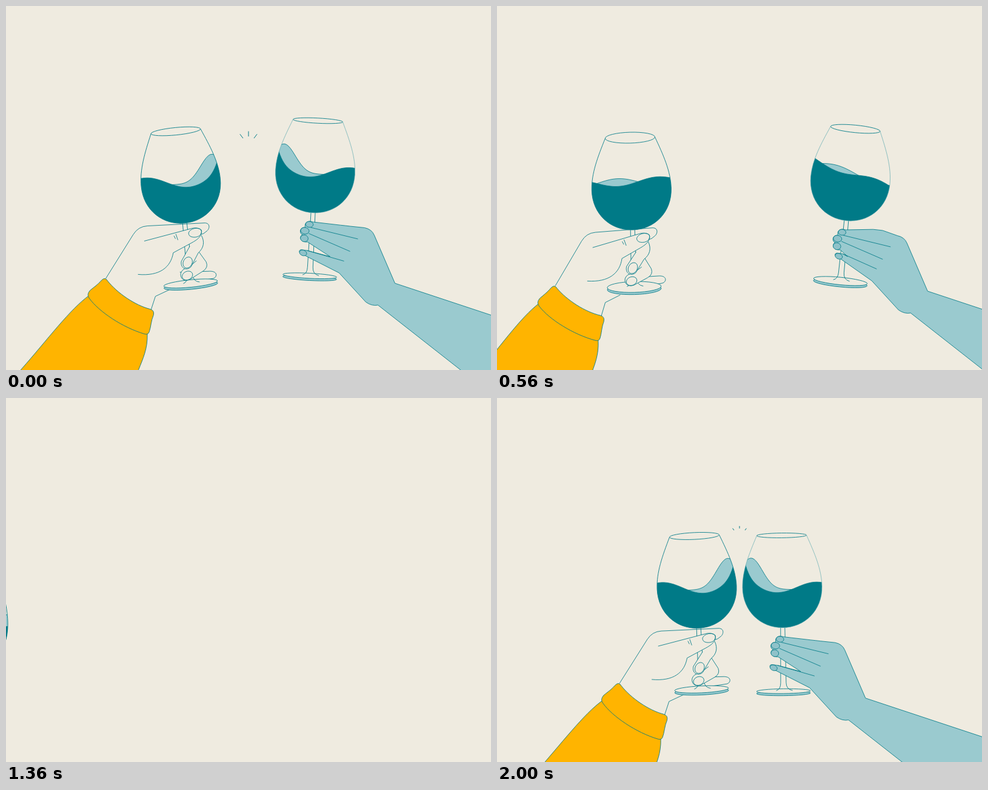
Write an HTML page with a canvas that moves like this. It is 800 px wide and 600 px high and loops after 2080 ms.

```html
<!DOCTYPE html>
<html lang="en">
<head>
<meta charset="utf-8">
<title>Cheers</title>
<style>
html, body { margin: 0; width: 100%; height: 100%; overflow: hidden; background: #efebe0; }
canvas { display: block; }
</style>
</head>
<body>
<canvas id="stage" width="800" height="600"></canvas>
<script>
const ctx = document.getElementById('stage').getContext('2d');
const LOOP = 2080, STEP = 80, RAD = Math.PI / 180;
const BG = '#efebe0', TEAL = '#007a87', LIGHT = '#9acacf', NAIL = '#8fc2c9', YELLOW = '#ffb400';
const { sin, cos, exp, min, max, PI } = Math;

// Key points: time, distance from the middle, then height and outward lean of the left and right glass
const keys = [
  [0, 105.2, 357.8, 5.6, 340.8, 3],
  [240, 122.6, 355.2, 8.9, 336.1, 7.8],
  [560, 176.3, 369, 1.6, 353.8, 5.6],
  [880, 409, 417, -8.9, 417.2, -10.3],
  [1040, 490, 436, -9, 432, -12],
  [1360, 473.5, 446, -9, 438, -9.5],
  [1680, 354.2, 444.5, -6.7, 437.1, -12.1],
  [1840, 232, 428, -3, 427, -7],
  [2000, 67.3, 379.3, 2.7, 378.5, -.7]
];

// Smooth cyclic curve through the key points
function pose(t) {
  const n = keys.length, i = keys.findLastIndex(k => k[0] <= t);
  const around = [i - 1, i, i + 1, i + 2];
  const [a, b, c, d] = around.map(j => keys[(j + n) % n]);
  const [t0, t1, t2, t3] = around.map(j => keys[(j + n) % n][0] + LOOP * Math.floor(j / n));
  const span = t2 - t1, u = (t - t1) / span, v = 1 - u;
  return b.map((_, k) => {
    const m1 = (c[k] - a[k]) / (t2 - t0) * span;
    const m2 = (d[k] - b[k]) / (t3 - t1) * span;
    return (1 + 2 * u) * v * v * b[k] + u * v * v * m1 + u * u * (3 - 2 * u) * c[k] - u * u * v * m2;
  });
}

const bell = (x, mid, width) => exp(-(((x - mid) / width) ** 2));
const mix = (a, b, k) => a + (b - a) * k;

// Wine heights: a slope and a travelling ripple, thrown up the inner wall by the clink
function wine(t, side, lean) {
  const splash = bell((t + LOOP / 2) % LOOP, LOOP / 2 - 50, 170);
  const slope = max(0, lean) * (side > 0 ? 2.2 : 4.6);
  const ripple = u => min(10, t / 90) * cos(PI * (u - 1.2 + 2 * t / LOOP));
  return {
    front(u) {
      const v = u * side;
      const thrown = 66 + 9 * cos(PI * (v + .85)) + 55 * exp(7 * (v - 1));
      return mix(79 + slope * v + ripple(u), thrown, splash);
    },
    back(u) {
      const v = u * side;
      return mix(79 + .7 * slope * v - ripple(u), 62 + 54 * bell(v, .78, .4), splash);
    }
  };
}

function paint(path, fill, line = TEAL, width = .85) {
  if (typeof path === 'string') path = new Path2D(path);
  if (fill) { ctx.fillStyle = fill; ctx.fill(path); }
  ctx.strokeStyle = line;
  ctx.lineWidth = width;
  ctx.stroke(path);
}

function oval(x, y, rx, ry, fill, turn = 0) {
  const p = new Path2D();
  p.ellipse(x, y, rx, ry, turn * RAD, 0, 7);
  paint(p, fill);
}

// Draws with (x, y) as origin, turned, then shifted
function within(x, y, turn, dx, dy, draw) {
  ctx.save();
  ctx.translate(x, y);
  ctx.rotate(turn * RAD);
  ctx.translate(dx, dy);
  draw();
  ctx.restore();
}

function surface(cx, height) {
  const p = new Path2D();
  p.moveTo(cx - 80, 20);
  for (let x = -80; x <= 80; x += 2) p.lineTo(cx + x, -height(max(-1, min(1, x / 66))));
  p.lineTo(cx + 80, 20);
  return p;
}

const bowl = new Path2D('M-41-152C-54-122-65.5-95-65.5-67C-65.5-27-36 0 0 0C36 0 65.5-27 65.5-67C65.5-95 54-122 41-152');

function glass(x, y, tilt, depth, { front, back }, edge, edgeWidth) {
  within(x, y, tilt, 0, 0, () => {
    const foot = 113 - 2.1 * depth;
    oval(0, foot + 3.5, 44.5, depth, LIGHT);
    oval(0, foot, 44.5, depth, BG);
    paint(`M-3.5 0L-4.5 ${foot - 14}Q-4.5 ${foot - 3}-12 ${foot - 1}M3.5 0L4.5 ${foot - 14}Q4.5 ${foot - 3} 15 ${foot - 1}`);
    ctx.save();
    ctx.clip(bowl);
    ctx.rotate(-tilt * RAD);
    const cx = 68 * sin(tilt * RAD);
    paint(surface(cx, back), LIGHT);
    paint(surface(cx, front), TEAL);
    ctx.restore();
    paint(bowl, null, edge, edgeWidth);
    oval(0, -152, 41, depth);
  });
}

function leftSide(t, x, y, lean, swing) {
  const depth = 6.8 + 2.2 * swing, slide = (6 - depth) * .8;
  const arm = draw => within(x - .8, y + slide, -1.2 * swing, -294.8, -357.8, draw);

  arm(() => {
    paint('M166 450L211 377Q219 364 234 363L329 357.5C338 358 337 367 332 371Q327 376 321 377');
    paint('M241 501L248 479L273 467');
    paint('M288 439L338 437C351 437 350 447 343 449L318 453');
  });
  glass(x, y, -lean, depth, wine(t, 1, lean), TEAL, .85);

  // Fingers curled around the stem follow the glass
  within(x - .8, y + slide, 5.6 - lean, -294.8, -357.8, () => {
    paint('M318 404L331 422Q335 431 326 437L304 451C294 455 288 449 289 441Q291 434 299 432', BG);
    oval(300, 444.5, 9, 7, BG, -25);
    paint('M323 378C329 389 327 399 318 407L306 430C299 437 288 433 290 421L304 396', BG);
    oval(300.5, 423, 7.3, 9.5, BG, 25);
    paint('M308 426L315 420');
  });
  arm(() => {
    paint('M229 388L306 367C315 364 326 367 323 375C321 382 315 386 308 390L277 407C273 431 255 446 219 443', BG);
    paint('M302 374C305 366 318 364 323 369C325 378 317 382 309 381Q302 380 302 374Z');
    paint('M278 379L280.5 384M281 376L284.5 386');
    paint('M139 478C108 500 70 552 28 600L-40 682L190 680L221 600C228 582 236 565 235 541', YELLOW);
    paint('M159 453Q165 447 169 454C185 474 215 494 239 500Q247 502 245 510C241 519 241 530 238 538Q236 543 230 541C195 531 155 505 139 483Q134 477 140 470C147 464 152 461 159 453Z', YELLOW);
  });
}

function rightSide(t, x, y, lean, swing) {
  glass(x, y, lean, 4.7 + 1.5 * swing, wine(t, -1, lean), '#4fa3ab', .6);

  // Away from the clink the index finger bends and the little finger lifts
  const lift = max(0, min(1, (t - 240) / 320, (2000 - t) / 320));
  const hump = 362 - 6 * lift;
  const tip = (px, py) => `${px + 5 * lift} ${py - 7.5 * lift}`;
  within(x + (3 - lean) * .4, y, 0, -505, -340.8, () => {
    paint(`M505 356L550 ${hump - .8}Q558 ${hump} 566 ${hump + 1}L590 365.5Q602 368 606 378L640 457L960 563L960 766
      L612 493Q602 495 592 488L548 440L${tip(491, 411)}C${tip(480, 409)} ${tip(480, 400)} ${tip(488, 402)}
      L${tip(495, 403)}L${533 - 25 * lift} ${413 - 13 * lift}L496 389C482 390 482 378 488 377C482 376 482 364 492 365C490 354 500 354 505 356Z`, LIGHT);
    paint(`M501 365L579 384M498 375L566 404.5M${tip(495, 403)}L556 420.5`);
    oval(499, 360, 6.3, 4.8, NAIL, 5);
    oval(491.5, 370.5, 7, 5.4, NAIL, 10);
    oval(490.5, 383, 6.4, 5.6, NAIL, 15);
    oval(488.5 + 5 * lift, 407 - 7.5 * lift, 6.2, 4.5, NAIL, 22);
  });
}

// Three short rays above the clink grow, then fly off
function spark(t) {
  const age = (t + STEP) % LOOP / STEP;
  if (age > 2) return;
  const outer = 19 + 4.5 * min(age, 1) + 1.5 * max(0, age - 1);
  const inner = 15 + 4 * max(0, age - 1);
  for (const dx of [-.6, 0, .6]) {
    const dy = -Math.sqrt(1 - dx * dx);
    paint(`M${400 + dx * inner} ${230 + dy * inner}L${400 + dx * outer} ${230 + dy * outer}`, null, TEAL, 1);
  }
}

let start;
function frame(now) {
  start ??= now;
  const t = Math.floor((now - start) % LOOP / STEP) * STEP;
  const [, spread, leftY, leftLean, rightY, rightLean] = pose(t);
  const swing = sin(2 * PI * (t - 100) / LOOP);
  ctx.fillStyle = BG;
  ctx.fillRect(0, 0, 800, 600);
  leftSide(t, 400 - spread, leftY, leftLean, swing);
  rightSide(t, 400 + spread + 15 * min(0, swing) ** 2, rightY, rightLean, swing);
  spark(t);
  requestAnimationFrame(frame);
}
requestAnimationFrame(frame);
</script>
</body>
</html>
```
